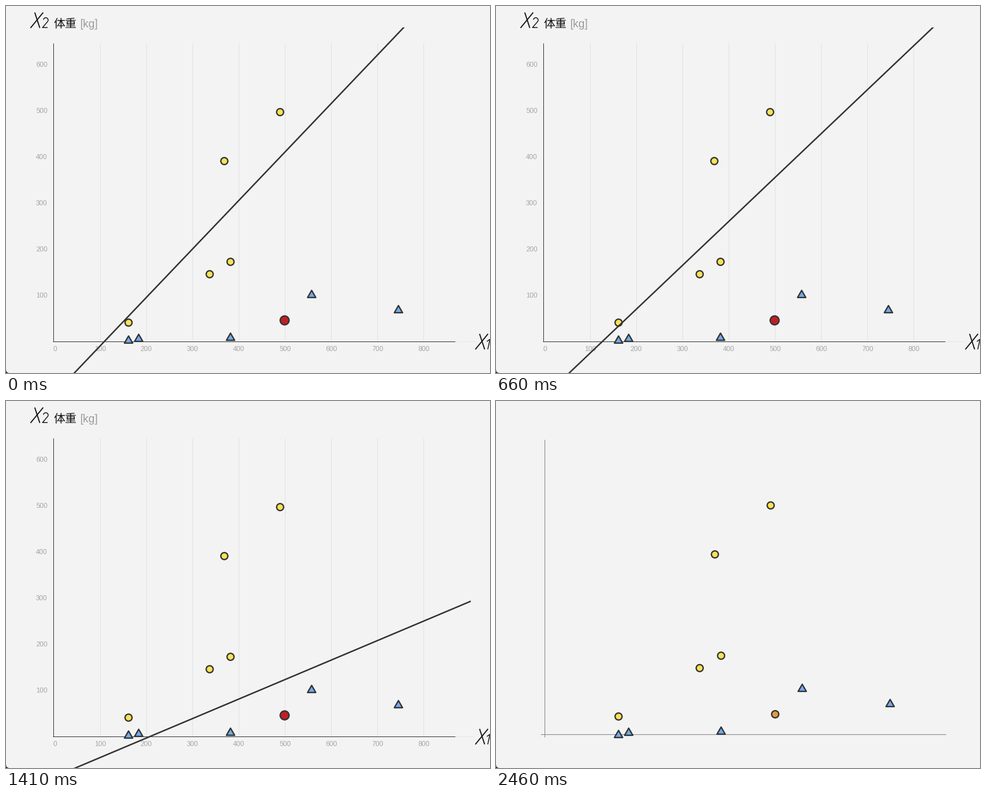
Recreate the animation shown at these times as a matplotlib script. Size 859x652 px, loop 2490 ms.

```python
import numpy as np
import matplotlib.pyplot as plt
from matplotlib.animation import FuncAnimation
from matplotlib.markers import MarkerStyle
from matplotlib.patches import Polygon, Rectangle
from matplotlib.path import Path

W, H, DPI = 859, 652, 100
STEP, FRAMES = 30, 83
PX = 72 / DPI
INK = "#333333"
RED, YELLOW = np.array([188, 32, 38]) / 255, np.array([250, 226, 84]) / 255

fig = plt.figure(figsize=(W / DPI, H / DPI), dpi=DPI, facecolor="#f3f3f3")
ax = fig.add_axes([0, 0, 1, 1])
ax.set_xlim(0, W)
ax.set_ylim(H, 0)
ax.axis("off")


def stroke(xs, ys, color, width=1, **kw):
    kw.setdefault("solid_capstyle", "butt")
    return ax.plot(xs, ys, color=color, lw=width * PX, **kw)[0]


def label(x, y, s, size, color, ha="center", font="Liberation Sans"):
    return ax.text(x, y, s, fontsize=size * PX, color=color, ha=ha,
                   va="center_baseline", family=font)


def smooth(t, start, end):
    u = np.clip((t - start) / (end - start), 0, 1)
    return u * u * (3 - 2 * u)


# Grid, axes and labels: everything here fades away near the end
fading = []
for i in range(9):
    x = 84.5 + 82.1 * i
    if i:
        fading.append(stroke([x, x], [66, 595], "#e1e1e1", zorder=1))
    fading.append(label(x + (0.3 if i else 2.3), 608.3, str(100 * i), 12.3, "#a6a6a6"))
for i in range(1, 7):
    fading.append(label(73.5, 595.6 - 82.05 * i, str(100 * i), 12.3, "#a6a6a6", "right"))
fading.append(stroke([797, 832], [595.5, 595.5], "#e4e4e4"))


def big_x(x, y):
    for xs in ([x + 7.5, x + 16.5], [x + 22.5, x]):
        fading.append(stroke(xs, [y, y + 27.5], "#111111", 1.9))


big_x(43.5, 11.5)
big_x(833, 582.5)
s = np.linspace(np.pi * 1.05, np.pi * 2.2, 16)
two_x = np.r_[70.6 + 4.2 * np.cos(s), 64.8, 73.8]
two_y = np.r_[25 + 4.2 * np.sin(s), 38.3, 38.3]
fading.append(stroke(two_x, two_y, "#111111", 1.5))
fading.append(stroke([853.5, 859, 855], [596, 592, 610], "#111111", 1.5))
fading.append(label(84.8, 29.9, "体重", 20.5, "#111111", "left", "Noto Sans CJK JP"))
fading.append(label(131.5, 30.3, "[kg]", 19.8, "#9c9c9c", "left"))

old_axes = [stroke([83.5, 83.5], [66, 596], "#2a2a2a", zorder=2),
            stroke([83, 797], [595.5, 595.5], "#2a2a2a", zorder=2)]
new_axes = [stroke([], [], "#858585", 1.1, snap=False, zorder=2) for _ in range(2)]

# Data points
circles = np.array([[486, 188.2], [386.9, 275.2], [397.6, 454.3], [360.6, 476], [217, 562.3]])
triangles = np.array([[217, 592.4], [234.5, 588.9], [398, 587.4], [541.5, 510.8], [696.4, 537.8]])
query = np.array([[494, 558.3]])
tri = Path([[-7.3, -6.4], [0, 6.3], [7.3, -6.4], [-7.3, -6.4]], closed=True)


def markers(marker, size, fill, z):
    return ax.plot([], [], ls="", marker=marker, ms=size * PX, mfc=fill, mec=INK,
                   mew=2.4 * PX, snap=False, zorder=z)[0]


yellow = markers("o", 12.4, YELLOW, 5)
blue = markers(MarkerStyle(tri, joinstyle="miter"), 14.6, "#73aaee", 5)
dot = markers("o", 15.8, RED, 5)

# Swinging boundary: time, slope, drop below the origin
keys = np.array([
    [0, 1.05, 95.5], [200, 1.005, 100], [390, 1.035, 98.3], [480, 1.25, 70],
    [550, 1.08, 91], [800, 0.87, 105], [930, 0.927, 104.8], [1230, 1.034, 102.3],
    [1500, 0.208, 63], [2490, 0.208, 63]])


def curve(t, col):
    """Hermite curve through the keys, flat at turning points."""
    ts, v = keys[:, 0], keys[:, col]
    d = np.diff(v) / np.diff(ts)
    tan = np.zeros(len(v))
    tan[1:-1] = np.where(d[:-1] * d[1:] > 0, 2 * d[:-1] * d[1:] / (d[:-1] + d[1:] + 1e-12), 0)
    i = min(np.searchsorted(ts, t, side="right") - 1, len(ts) - 2)
    h = ts[i + 1] - ts[i]
    u = (t - ts[i]) / h
    return (v[i] * (1 + 2 * u) * (1 - u) ** 2 + h * tan[i] * u * (1 - u) ** 2
            + v[i + 1] * u * u * (3 - 2 * u) + h * tan[i + 1] * u * u * (u - 1))


def boundary(t, x):
    return 595.6 + curve(t, 2) - curve(t, 1) * (x - 84)


window = Rectangle((40, 38), 785, 620, transform=ax.transData)
line = stroke([], [], INK, 2.6, zorder=6)
dust = ax.plot([], [], ls="", marker=",", color="#3a3a3a", alpha=0.65,
               antialiased=False, zorder=4)[0]
for art in (line, dust):
    art.set_clip_path(window)

rng = np.random.default_rng(4)
COUNT = 3200
dust_x = 55 + 770 * rng.random(COUNT) ** 0.8
dust_off = rng.normal(0, 1, (2, COUNT))
dust_life = rng.random(COUNT)

ax.add_patch(Polygon([[0, 646], [1, 650], [5, 652], [0, 652]], color="#2a2a2a", lw=0, zorder=9))


def moved(points, k):
    x, y = points.T
    return x + k * 0.0052 * (x - 217), y - k * (2 + 0.004 * (563 - y))


def update(i):
    t = i * STEP

    xs = np.array([40.0, 825.0])
    line.set_data(xs, boundary(t, xs))
    line.set_alpha(1 - smooth(t, 1455, 1530))

    spread = 14 * np.sqrt(np.clip((t - 1440) / 150, 0, 3))
    shown = (dust_life > (t - 1600) / 170) & (1455 < t < 1790)
    px = dust_x + 0.3 * spread * dust_off[0]
    py = boundary(t, dust_x) + spread * dust_off[1]
    dust.set_data(px[shown], py[shown])

    fade = 1 - smooth(t, 1800, 2350)
    for art in fading:
        art.set_alpha(fade)
    for art in old_axes:
        art.set_alpha(1 - smooth(t, 1830, 2120))
    k = max(0, (t - 1980) / 480) ** 2
    ox, oy = 83.3 + 3.4 * k, 595.2 - 2.6 * k
    new_axes[0].set_data([ox, ox], [70 - k, oy + 5 * k])
    new_axes[1].set_data([ox - 7 * k, 797 + 2 * k], [oy, oy])
    for art in new_axes:
        art.set_alpha(smooth(t, 1800, 2000))

    yellow.set_data(*moved(circles, k))
    blue.set_data(*moved(triangles, k))
    dot.set_data(*moved(query, k))
    mix = np.clip((t - 1790) / 1060, 0, 1)
    dot.set_markerfacecolor(RED + (YELLOW - RED) * mix)
    dot.set_markersize((15.8 - 5 * mix) * PX)
    return []


anim = FuncAnimation(fig, update, frames=FRAMES, interval=STEP, repeat=True, repeat_delay=0)
plt.show()
```
